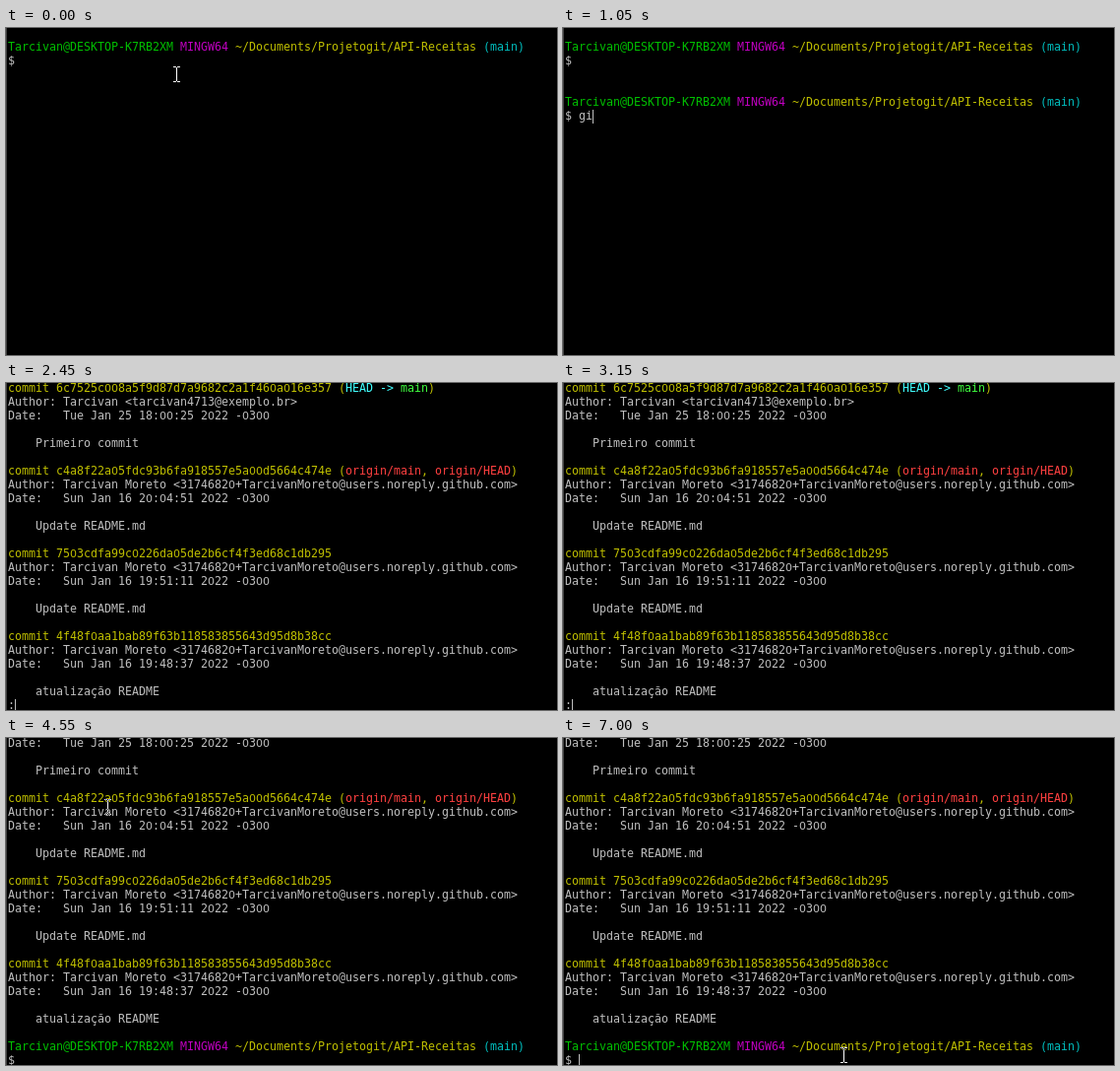
Animation, 560 px wide and 332 px high, one loop 7350 ms. Source, as an HTML page with a canvas:

```html
<!DOCTYPE html>
<html lang="pt">
<head>
<meta charset="utf-8">
<title>git log</title>
<style>
html, body { margin: 0; width: 100%; height: 100%; overflow: hidden; background: #000; }
canvas { display: block; width: 560px; height: 332px; }
</style>
</head>
<body>
<canvas id="stage" width="560" height="332"></canvas>
<script>
const ctx = document.getElementById('stage').getContext('2d');

const STEP = 350, STEPS = 21;
const CELL = 7, LINE = 14, LEFT = 2;
const MONO = '11.63px "DejaVu Sans Mono", monospace';
const ZERO = '11px "DejaVu Sans", sans-serif'; // plain zero without a dot

const GRAY = '#bfbfbf', GREEN = '#00bf00', MAGENTA = '#bf00bf', YELLOW = '#bfbf00',
      CYAN = '#00bfbf', BRIGHT_CYAN = '#40ffff', BRIGHT_GREEN = '#40ff40', BRIGHT_RED = '#ff4040';

const plain = text => [[GRAY, text]];
const typed = text => plain('$ ' + text);

const PROMPT = [
  [GREEN, 'Tarcivan@DESKTOP-K7RB2XM '],
  [MAGENTA, 'MINGW64 '],
  [YELLOW, '~/Documents/Projetogit/API-Receitas '],
  [CYAN, '(main)']
];

const AUTHOR = 'Tarcivan Moreto <31746820+TarcivanMoreto@users.noreply.github.com>';

function commit(hash, refs, author, date, message) {
  return [
    [[YELLOW, 'commit ' + hash], ...refs],
    plain('Author: ' + author),
    plain('Date:   ' + date + ' 2022 -0300'),
    [],
    plain('    ' + message),
    []
  ];
}

const LOG = [
  ...commit('6c7525c008a5f9d87d7a9682c2a1f460a016e357',
    [[YELLOW, ' ('], [BRIGHT_CYAN, 'HEAD -> '], [BRIGHT_GREEN, 'main'], [YELLOW, ')']],
    'Tarcivan <tarcivan4713@exemplo.br>', 'Tue Jan 25 18:00:25', 'Primeiro commit'),
  ...commit('c4a8f22a05fdc93b6fa918557e5a00d5664c474e',
    [[YELLOW, ' ('], [BRIGHT_RED, 'origin/main'], [YELLOW, ', '], [BRIGHT_RED, 'origin/HEAD'], [YELLOW, ')']],
    AUTHOR, 'Sun Jan 16 20:04:51', 'Update README.md'),
  ...commit('7503cdfa99c0226da05de2b6cf4f3ed68c1db295', [],
    AUTHOR, 'Sun Jan 16 19:51:11', 'Update README.md'),
  ...commit('4f48f0aa1bab89f63b118583855643d95d8b38cc', [],
    AUTHOR, 'Sun Jan 16 19:48:37', 'atualização README')
];

// What has been typed at each step of the first screen
const TYPING = ['', '', '', 'gi', 'git', 'git l', 'git log'];

// Steps at which the text caret is dark
const CARET_OFF = new Set([0, 2, 8, 11, 13, 16, 19]);

// Left top corner of the pointer, by step
const POINTER = {
  0: [170, 39], 1: [28, 88],
  13: [100, 62], 14: [161, 96], 15: [212, 138], 16: [215, 139],
  17: [207, 144], 18: [185, 194], 19: [282, 314], 20: [282, 314]
};

function drawLine(parts, row) {
  const y = row * LINE + 9;
  let x = LEFT;
  for (const [color, text] of parts) {
    ctx.fillStyle = color;
    for (const ch of text) {
      ctx.font = ch === '0' ? ZERO : MONO;
      ctx.fillText(ch, x + CELL / 2, y);
      x += CELL;
    }
  }
}

function drawCaret(col, row) {
  ctx.fillStyle = GRAY;
  ctx.fillRect(LEFT + col * CELL, row * LINE - 1, 1, LINE);
}

function drawPointer(x, y) {
  ctx.globalCompositeOperation = 'difference';
  ctx.fillStyle = '#fff';
  for (const dy of [0, 15]) {
    ctx.fillRect(x, y + dy, 3, 1);
    ctx.fillRect(x + 4, y + dy, 3, 1);
  }
  ctx.fillRect(x + 3, y + 1, 1, 14);
  ctx.globalCompositeOperation = 'source-over';
}

function screen(step) {
  if (step < 7) {
    const lines = [[], PROMPT, typed('')];
    if (step > 0) lines.push([], [], PROMPT, typed(TYPING[step]));
    return { lines, caret: [2 + TYPING[step].length, 6] };
  }
  if (step < 10) return { lines: [...LOG.slice(0, 23), plain(':')], caret: [1, 23] };
  return { lines: [...LOG.slice(2), PROMPT, typed('')], caret: [2, 23] };
}

function draw(step) {
  ctx.fillStyle = '#000';
  ctx.fillRect(0, 0, 560, 332);
  ctx.fillStyle = '#404040';
  ctx.fillRect(0, 0, 1, 332);
  ctx.textAlign = 'center';
  ctx.textBaseline = 'alphabetic';

  const { lines, caret } = screen(step);
  lines.forEach(drawLine);
  if (!CARET_OFF.has(step)) drawCaret(...caret);
  if (POINTER[step]) drawPointer(...POINTER[step]);
}

const start = performance.now();
function tick() {
  const elapsed = Math.max(0, performance.now() - start);
  draw(Math.floor(elapsed / STEP) % STEPS);
  requestAnimationFrame(tick);
}
tick();
</script>
</body>
</html>
```
